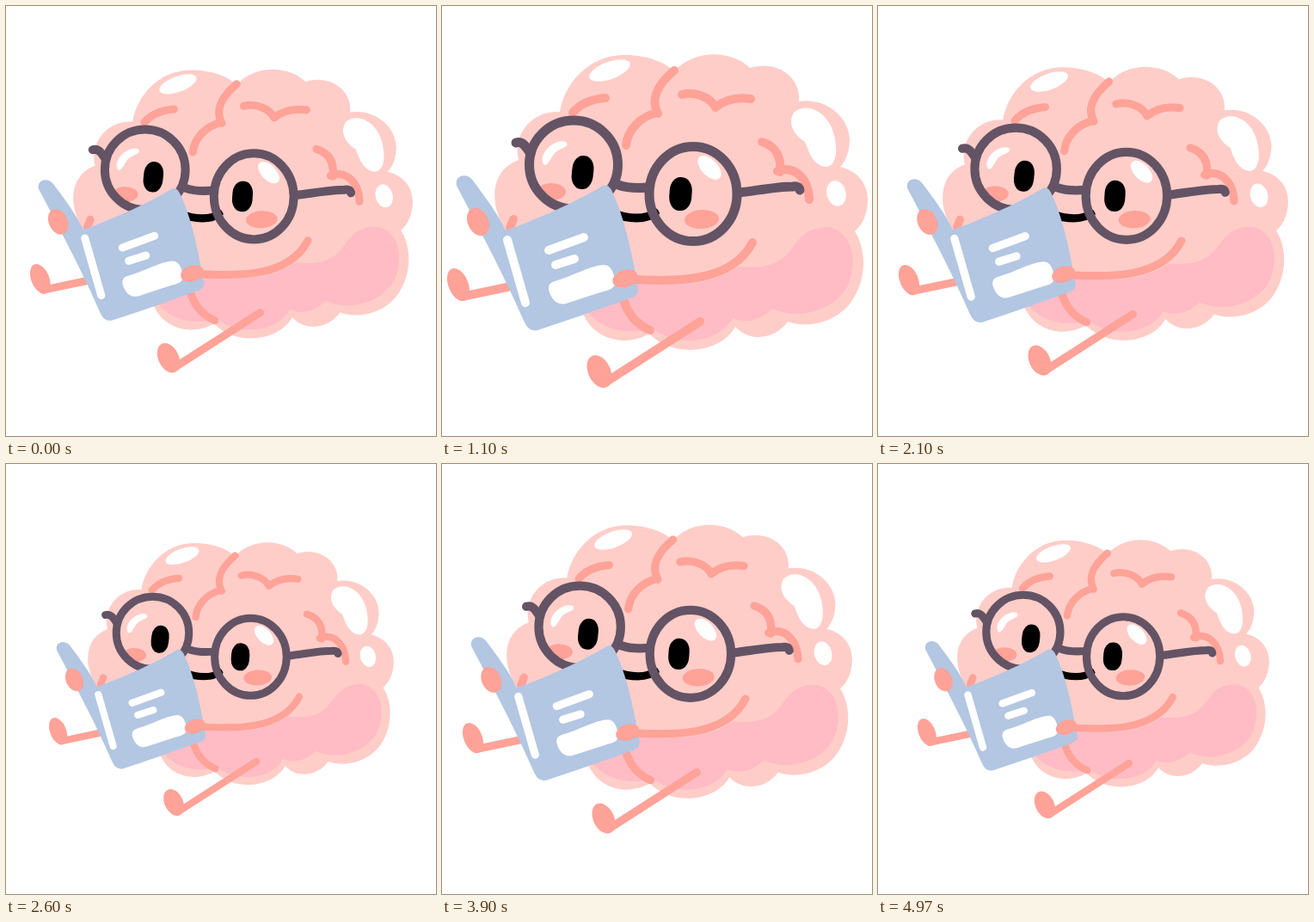
An HTML page for the animation above (5.01 s loop, 500 by 500 pixels).

```html
<!DOCTYPE html>
<html lang="en">
<head>
<meta charset="utf-8">
<title>Reading brain</title>
<style>
  html, body { margin: 0; width: 100%; height: 100%; overflow: hidden; background: #fff; }
  svg { display: block; width: 100%; height: 100%; }
  .line { fill: none; stroke-linecap: round; stroke-linejoin: round; }
  .coral { stroke: #ffa298; stroke-width: 10; }
  .frame { stroke: #635364; stroke-width: 11; }
  .print { stroke: #fff; stroke-width: 10; }
  .skin { fill: #ffa298; }
  .white { fill: #fff; }
</style>
</head>
<body>
<svg viewBox="0 0 500 500">
  <g id="brain">
    <!-- body -->
    <path fill="#ffcdc8" d="M137 123 C142 91 170 57 212 57 C236 57 258 64 270 76 C292 51 335 50 358 72
      C388 62 418 82 415 111 C445 106 473 128 474 155 C474 168 470 180 463 187
      C484 192 496 208 495 228 C494 243 489 254 480 262 C493 282 494 314 479 339
      C463 367 427 376 402 367 C388 387 358 392 341 373 C325 403 270 411 241 381
      C214 397 178 388 165 360 L75 262 C57 237 52 193 89 179 C82 150 104 121 137 123Z"/>
    <path fill="#ffbcc5" d="M222 313 C258 328 310 328 345 303 C365 305 386 304 400 290
      C412 278 418 257 449 257 C474 261 483 290 475 316 C467 348 421 369 384 352
      C370 366 352 370 338 363 C322 393 272 397 245 375 C220 383 185 378 168 354Z"/>

    <!-- folds -->
    <g class="line coral">
      <path d="M270 75 C250 92 242 108 251 125 M250 124 C230 129 216 144 214 162"/>
      <path d="M279 103 C294 99 312 106 318 118 C330 108 344 106 359 108"/>
      <path d="M152 124 C162 112 176 108 190 107"/>
      <path d="M372 158 C388 163 395 175 393 193 M390 192 C409 185 426 199 427 225"/>
      <path d="M210 338 C215 358 226 370 242 377"/>
      <path d="M83 248 L79 258"/>
    </g>

    <!-- shine -->
    <ellipse class="white" cx="195" cy="75" rx="25" ry="10" transform="rotate(-20 195 75)"/>
    <path class="white" d="M409 124 C422 111 449 121 456 150 C462 176 455 187 446 187
      C431 185 427 170 422 158 C408 149 402 136 409 124Z"/>
    <ellipse class="white" cx="458.500" cy="218" rx="11" ry="15" transform="rotate(-15 458 218)"/>

    <!-- legs -->
    <path class="line coral" d="M300 367 L191 437 M23 338 L80 326"/>
    <ellipse class="skin" cx="183" cy="425" rx="13" ry="20" transform="rotate(-25 183 425)"/>
    <ellipse class="skin" cx="19" cy="324" rx="11.500" ry="20" transform="rotate(-22 19 324)"/>

    <!-- face -->
    <ellipse class="skin" cx="127" cy="216" rx="17" ry="10"/>
    <ellipse class="skin" cx="302" cy="248" rx="20" ry="11" transform="rotate(-3 302 248)"/>
    <rect x="151" y="174" width="25" height="39" rx="11.500" ry="16" transform="rotate(6 163 194)"/>
    <rect x="264.500" y="199" width="26" height="39" rx="12" ry="16" transform="rotate(4 277 218)"/>
    <path class="line" stroke="#000" stroke-width="10" d="M200 241 C215 248 239 249 247 240"/>
    <path class="line" stroke="#000" stroke-width="4" d="M244 235 L251 241"/>
    <path class="white" d="M117 182 C114 168 133 154 144 158 C150 164 137 165 131 171 C126 177 121 191 117 182Z"/>
    <ellipse class="white" cx="311" cy="188" rx="17" ry="9.500" transform="rotate(46 311 188)"/>

    <!-- glasses -->
    <g class="line frame">
      <circle cx="153" cy="184.500" r="51.500"/>
      <ellipse cx="292" cy="218.500" rx="51" ry="55"/>
      <path d="M205 208 C216 212 228 212 240 211 M103 172 C97 162 93 157 86 159
        M346 217 C370 214 390 210 408 210 Q415 209 416 214"/>
    </g>

    <!-- book -->
    <path fill="#b3c6e2" d="M17 209 C14 197 29 193 36 203 C50 222 64 240 74 261
      C105 250 152 230 185 210 Q192 205 197 214 C212 244 221 288 228 328
      Q229 336 221 339 C184 352 148 365 111 377 Q101 379 96 368 C75 320 57 285 17 209Z"/>
    <path class="line print" d="M76 272 L97 345 M124 284 L165 269 M132 301 L154 294"/>
    <path class="white" d="M131 320 C152 314 172 302 188 301 C198 301 201 314 201 322
      C201 330 190 331 184 333 L144 346 C132 349 126 338 124 330 Q123 322 131 320Z"/>

    <!-- arms -->
    <path class="line coral" d="M210 317 C270 321 336 323 361 275"/>
    <ellipse class="skin" cx="213" cy="317" rx="15" ry="10" transform="rotate(-18 213 317)"/>
    <ellipse class="skin" cx="42" cy="251" rx="12" ry="17" transform="rotate(-25 42 251)"/>
  </g>
</svg>
<script>
  const LOOP = 5010, STEP = 100 / 3, BEAT = 27, LAST = 149;
  const REST = 0.8, SWELL = 0.2, DRAWN = 0.976;

  // One beat: [step, swell], joined by a monotone cubic curve.
  const keys = [[-7, 0.004], [-3, 0], [0, 0.44], [4.5, 1], [6, 0.88], [9, 0.52],
                [10, 0.42], [14, 0.08], [17, 0.02], [20, 0.004], [24, 0], [27, 0.44]];

  const secant = i => (keys[i + 1][1] - keys[i][1]) / (keys[i + 1][0] - keys[i][0]);

  function slope(i) {
    if (i === 0 || i === keys.length - 1) return 0.125 * (i > 0);
    const a = secant(i - 1), b = secant(i);
    return a * b > 0 ? 2 * a * b / (a + b) : 0;
  }

  function swell(x) {
    let i = 0;
    while (x >= keys[i + 1][0]) i++;
    const [x0, y0] = keys[i], [x1, y1] = keys[i + 1];
    const w = x1 - x0, t = (x - x0) / w, r = 1 - t;
    return y0 * r * r * (1 + 2 * t) + y1 * t * t * (3 - 2 * t)
         + w * t * r * (slope(i) * r - slope(i + 1) * t);
  }

  const brain = document.getElementById('brain');
  const start = performance.now();

  function draw(now) {
    const time = Math.max(0, now - start) % LOOP;
    const step = Math.min(LAST, Math.floor((time + 3.4) / STEP));
    const scale = (REST + SWELL * swell(step % BEAT)) / DRAWN;
    brain.setAttribute('transform',
      `translate(250 250.5) scale(${scale}) translate(-250 -250.5)`);
    requestAnimationFrame(draw);
  }
  draw(start);
</script>
</body>
</html>
```
